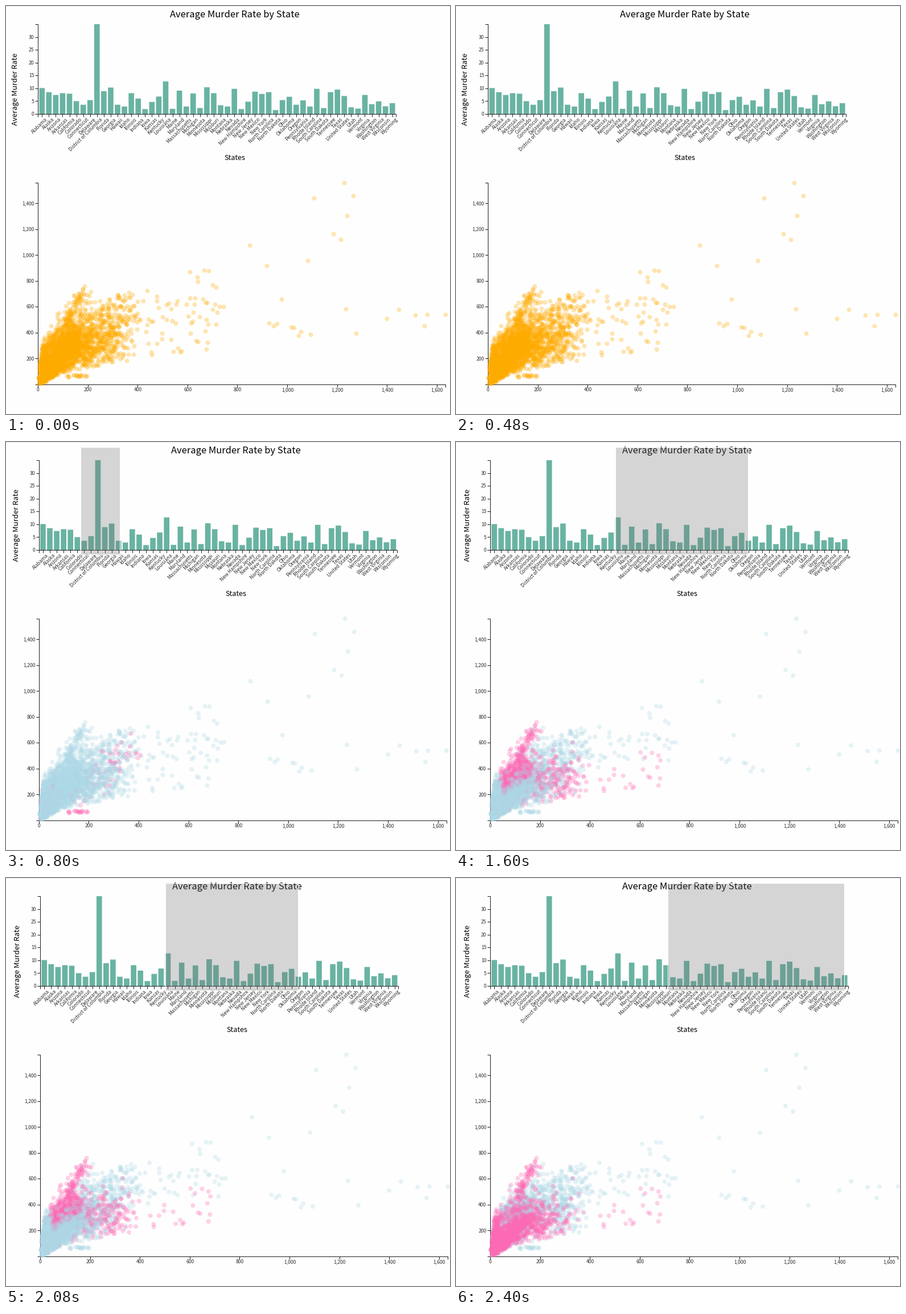
Animation of 780 by 718 pixels, one loop 3200 ms. Source, as a matplotlib script:

```python
import numpy as np
import matplotlib.pyplot as plt
from matplotlib.animation import FuncAnimation
from matplotlib.patches import Rectangle

W, H, DPI = 780, 718, 100
PT = 72 / DPI                      # points per pixel
FONT = "Noto Sans CJK JP"
INK = "#1c1c1c"
X0, BAR_Y, DOT_Y = 56, 190, 666    # shared left edge and the two baselines
BAR_UNIT, DOT_UNIT_X, DOT_UNIT_Y = 158 / 35, 0.438, 0.2278

RATES = {
    "Alabama": 10.1, "Alaska": 8.5, "Arizona": 7.4, "Arkansas": 8.1,
    "California": 7.9, "Colorado": 5, "Connecticut": 3.6, "Delaware": 5.4,
    "District of Columbia": 35, "Florida": 8.9, "Georgia": 10.3,
    "Hawaii": 3.6, "Idaho": 2.9, "Illinois": 8.1, "Indiana": 6, "Iowa": 1.9,
    "Kansas": 4.7, "Kentucky": 6.8, "Louisiana": 12.7, "Maine": 2,
    "Maryland": 9.1, "Massachusetts": 2.9, "Michigan": 8, "Minnesota": 2.3,
    "Mississippi": 10.4, "Missouri": 8.1, "Montana": 3.4, "Nebraska": 2.9,
    "Nevada": 9.8, "New Hampshire": 1.9, "New Jersey": 4.8,
    "New Mexico": 8.7, "New York": 7.8, "North Carolina": 8.5,
    "North Dakota": 1.5, "Ohio": 5.4, "Oklahoma": 6.7, "Oregon": 3.6,
    "Pennsylvania": 5.3, "Rhode Island": 2.9, "South Carolina": 9.8,
    "South Dakota": 2.3, "Tennessee": 8.5, "Texas": 9.5,
    "United States": 7, "Utah": 2.6, "Vermont": 2.1, "Virginia": 7.4,
    "Washington": 3.8, "West Virginia": 4.9, "Wisconsin": 3, "Wyoming": 4.2,
}
STEP = 630 / (len(RATES) + 0.2)
BAR_W = 0.8 * STEP
BAR_X = X0 + STEP * (0.2 + np.arange(len(RATES)))

# Horizontal drift of the page and the brushed span of the bar chart
SCENES = [(0, None), (1.7, (129.3, 198.3)), (4, (275.5, 509)), (4, (368, 678))]

# The few isolated dots, as offsets from the scatter origin
FAR = [(538, 355), (485, 328), (554, 332), (543, 297), (519, 265), (532, 255),
       (372, 245), (402, 209), (474, 218), (428, 150), (541, 133), (634, 132),
       (613, 116), (663, 122), (684, 123), (716, 123), (679, 103), (559, 90)]

rng = np.random.default_rng(12)


def inside(u, v):
    """Fan that opens from the origin to the upper right."""
    top = np.interp(u, [0, 6, 24, 64, 84, 100, 190],
                    [8, 74, 108, 166, 179, 150, 174])
    low = np.interp(u, [0, 10, 44, 90, 190], [0, 3, 22, 28, 46])
    return (u > 1) & (u < 192) & (v < top) & (v > low)


def cloud(n, cx, cy, sx, sy, rho=0.0):
    """Correlated blob around an offset from the origin, cut to the fan."""
    cov = [[sx * sx, rho * sx * sy], [rho * sx * sy, sy * sy]]
    uv = rng.multivariate_normal((cx, cy), cov, 6 * n)
    return uv[inside(*uv.T)][:n]


def box(n, u0, u1, v0, v1):
    return rng.uniform((u0, v0), (u1, v1), (n, 2))


def block(first, last, *parts):
    """Shuffle the dots of neighbouring states and number them by state."""
    uv = rng.permutation(np.vstack(parts))
    return uv, np.sort(rng.integers(first, last + 1, len(uv)))


def make_dots():
    blocks = [
        block(0, 5, cloud(320, 44, 54, 22, 27, 0.75),
              cloud(200, 115, 112, 36, 30, 0.45),
              box(26, 190, 330, 105, 160), box(12, 265, 320, 140, 205),
              box(8, 400, 485, 84, 110), FAR),
        block(6, 11, cloud(50, 95, 68, 34, 26, 0.7),
              cloud(50, 18, 35, 12, 22, 0.5), cloud(26, 138, 105, 28, 20, 0.6),
              box(18, 50, 87, 13, 17)),
        block(12, 17, cloud(230, 46, 58, 22, 28, 0.75),
              cloud(40, 110, 105, 32, 26, 0.3)),
        block(18, 25, cloud(240, 46, 80, 16, 17, 0.3),
              cloud(130, 105, 68, 34, 21, 0.2)),
        block(26, 37, cloud(95, 60, 132, 14, 26, 0.88),
              cloud(190, 88, 66, 36, 24, 0.1),
              cloud(120, 34, 52, 17, 23, 0.7), box(22, 193, 300, 50, 120)),
        block(38, 51, cloud(260, 10, 36, 4, 20, 0.4),
              cloud(520, 30, 31, 20, 19, 0.85),
              cloud(190, 72, 55, 24, 18, 0.2)),
    ]
    uv, state = zip(*blocks)
    return np.vstack(uv) * (1, -1) + (X0, DOT_Y), np.concatenate(state)


fig = plt.figure(figsize=(W / 100, H / 100), dpi=DPI, facecolor="#fefefe")
ax = fig.add_axes([0, 0, 1, 1])
ax.axis("off")
ax.set(xlim=(0, W), ylim=(H, 0))
ax.autoscale(False)


def line(xs, ys):
    ax.plot(xs, ys, color=INK, lw=PT, zorder=2, solid_capstyle="butt",
            solid_joinstyle="miter")


def text(x, y, s, px, color="#333333", **kw):
    ax.text(x, y, s, fontsize=px * PT, family=FONT, color=color, zorder=4,
            va="baseline", **kw)


def y_axis(base, top, unit, values):
    line([X0 - 5, X0, X0, X0 - 5], [top, top, base, base])
    for v in values:
        y = base - v * unit
        line([X0 - 5, X0], [y, y])
        text(X0 - 6.5, y + 3.1, f"{v:,}", 8.6, ha="right")


def x_axis(base, end, ticks):
    line([X0, X0, end, end], [base + 5, base, base, base + 5])
    for x in ticks:
        line([x, x], [base, base + 5])


# Bar chart
ax.add_patch(Rectangle((-20, 0), W + 40, 1, color="#e4e4e8", lw=0))
text(402, 20.5, "Average Murder Rate by State", 16.5, "black", ha="center")
text(20.5, 146, "Average Murder Rate", 13.2, "black", rotation=90,
     ha="center", rotation_mode="anchor")
text(402, 271, "States", 12.6, "black", ha="center")
for x, (name, rate) in zip(BAR_X, RATES.items()):
    h = rate * BAR_UNIT
    ax.add_patch(Rectangle((x, BAR_Y - h), BAR_W, h, fc="#69b3a2", lw=0,
                           snap=False))
    text(x + BAR_W / 2 + 10, BAR_Y + 10, name, 8.6, rotation=45, ha="right",
         rotation_mode="anchor")
y_axis(BAR_Y, 32, BAR_UNIT, range(0, 31, 5))
x_axis(BAR_Y, 685, BAR_X + BAR_W / 2)

# Scatter plot
values = np.arange(0, 1601, 200)
ticks = X0 + values * DOT_UNIT_X
y_axis(DOT_Y, 311, DOT_UNIT_Y, values[1:-1])
x_axis(DOT_Y, 772, ticks)
for x, v in zip(ticks, values):
    text(x + 0.5, 678, f"{v:,}", 8.6, ha="center")

DOTS, STATE = make_dots()
dots = ax.scatter(*DOTS.T, s=(8 * PT) ** 2, c="#ffab00", alpha=0.3, lw=0,
                  zorder=3)
brush = Rectangle((0, 9), 1, BAR_Y - 1, fc=(0.467, 0.467, 0.467, 0.3),
                  ec="white", lw=PT, zorder=5)
ax.add_patch(brush)


def draw(i):
    drift, span = SCENES[i]
    ax.set_xlim(-drift, W - drift)
    brush.set_visible(span is not None)
    if span is None:
        dots.set_facecolor("#ffab00")
    else:
        lo, hi = span
        brush.set_x(lo)
        brush.set_width(hi - lo)
        left = BAR_X[STATE]
        picked = (left >= lo) & (left <= hi)
        dots.set_facecolor(np.where(picked, "#ff69b4", "#add8e6"))
    return dots, brush


anim = FuncAnimation(fig, draw, frames=len(SCENES), interval=800, repeat=True,
                     repeat_delay=0, blit=False)
plt.show()
```
